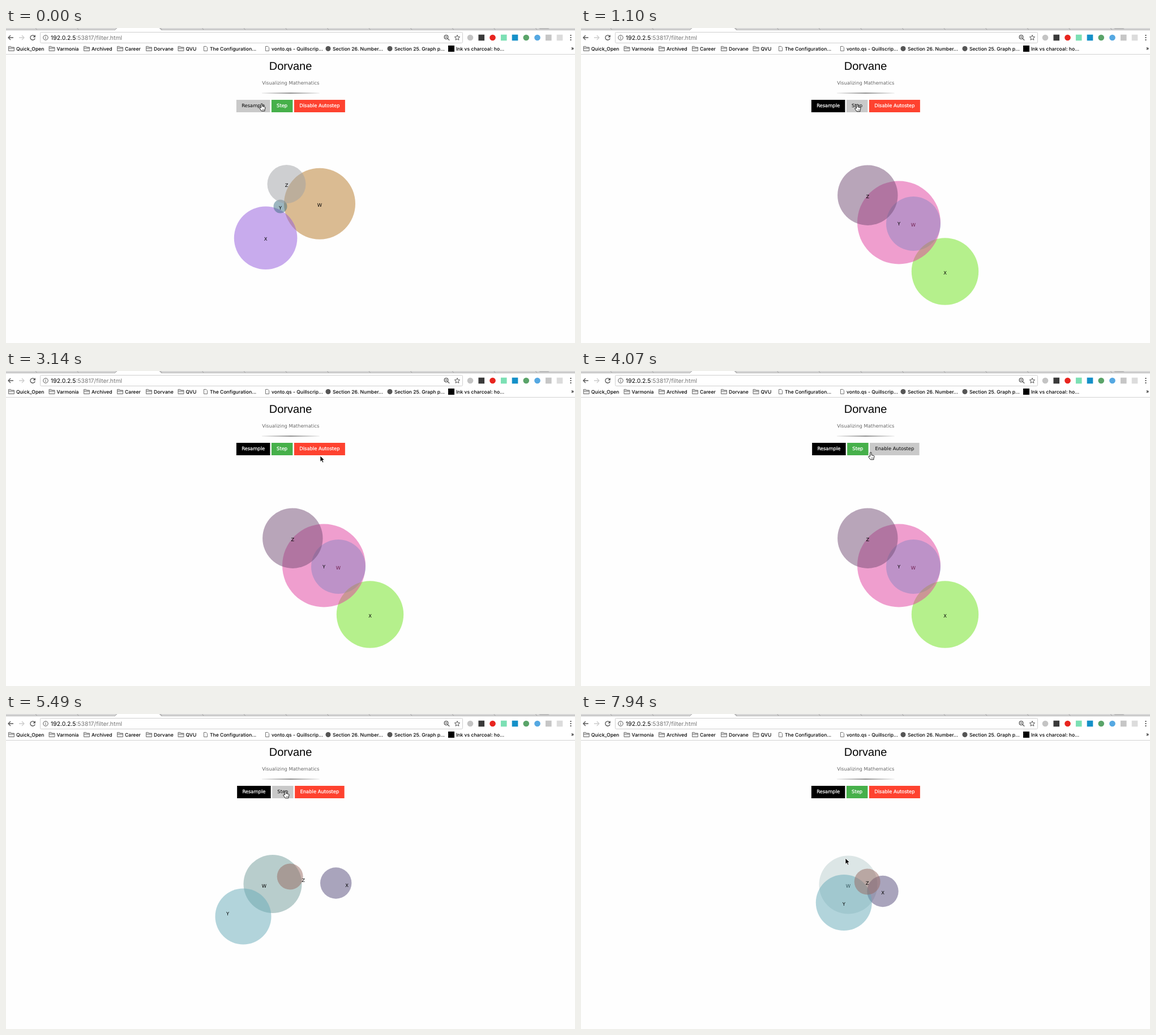
Recreate the animation shown at these times as an HTML page. Size 1005x557 px, loop 8000 ms.

```html
<!DOCTYPE html>
<html lang="en">
<head>
<meta charset="utf-8">
<title>Circle layout</title>
<style>
  html, body { margin: 0; width: 100%; height: 100%; overflow: hidden; background: #fefefe; }
  svg { display: block; width: 1005px; height: 557px; text-rendering: geometricPrecision; }
  .bar { font: 500 8.6px Inter, sans-serif; }
  .url { font: 10.4px Inter, sans-serif; }
  .title { font: 20px "Liberation Sans", Arial, sans-serif; }
  .page { font: 8.4px "DejaVu Sans", Verdana, sans-serif; }
  .mid { text-anchor: middle; }
  .line { fill: none; stroke: #555; stroke-width: 1.3; }
</style>
</head>
<body>
<svg viewBox="0 0 1005 557">
  <defs>
    <linearGradient id="fade">
      <stop offset="0" stop-color="#222" stop-opacity=".1"/>
      <stop offset=".5" stop-color="#222"/>
      <stop offset="1" stop-color="#222" stop-opacity=".1"/>
    </linearGradient>
    <clipPath id="canvas"><rect x="277" y="150" width="451.5" height="393.5"/></clipPath>
  </defs>

  <!-- browser bars -->
  <rect width="1005" height="46" fill="#fff"/>
  <g id="tabs"></g>
  <path d="M0 46.5H1005" stroke="#d2d2d2"/>
  <path class="line" d="M13 17H4M8 13L4 17L8 21"/>
  <path class="line" style="stroke:#ccc" d="M23 17h9M28 13l4 4l-4 4"/>
  <path class="line" d="M50.6 14.6A4.2 4.2 0 1 0 51.2 18.2"/>
  <path d="M52 12v4.5h-4.5z" fill="#555"/>
  <rect x="60.5" y="7.5" width="746" height="19" rx="2" fill="#fff" stroke="#cfcfcf"/>
  <circle class="line" cx="70" cy="17" r="4.2" style="stroke-width:1"/>
  <path d="M70 16.3v3M70 14.2v1.1" stroke="#555"/>
  <text class="url" x="79" y="20.7">192.0.2.5<tspan fill="#777">:53817/filter.html</tspan></text>
  <circle class="line" cx="777.5" cy="16" r="3.3"/>
  <path class="line" d="M780 18.6l3.2 3.2M776 16h3"/>
  <path id="star" class="line" style="stroke-width:1"/>
  <g id="icons"></g>
  <path d="M997.5 12v2m0 2v2m0 2v2" stroke="#555" stroke-width="2"/>
  <g id="marks" class="bar"></g>
  <text class="bar" x="998" y="39">»</text>

  <!-- page -->
  <text class="title mid" x="502.5" y="74">Dorvane</text>
  <text class="page mid" x="502.8" y="100" fill="#666">Visualizing Mathematics</text>
  <rect x="452" y="114.6" width="101.5" height="1" fill="url(#fade)"/>
  <g id="buttons" class="page mid"></g>
  <g id="shapes" class="page mid" clip-path="url(#canvas)"></g>
  <g id="pointer"></g>
</svg>
<script>
const el = id => document.getElementById(id);
const dot = (x, y, r, fill) => `<circle cx="${x}" cy="${y}" r="${r}" fill="${fill}"/>`;
const box = (x, y, r, fill) => `<rect x="${x - r}" y="${y - r}" width="${2 * r}" height="${2 * r}" fill="${fill}"/>`;

// ---- browser bars ----
let tabs = '<rect width="1005" height="3.5" fill="#d6d6d6"/><path d="M0 3.5H1005" stroke="#b4b4b4"/>';
for (let x = 54; x < 940; x += 73.6) tabs += `<path d="M${x - 2} 0l3 3.5" stroke="#aaa"/>`;
el('tabs').innerHTML = tabs +
  '<path d="M192 4l4-4H271l4 4z" fill="#fff"/><path d="M192 4l4-4M275 4l-4-4" stroke="#aaa"/>' +
  '<path d="M941 0h17l2 2h-17z" fill="#bbb"/>';

let star = '';
for (let i = 0; i < 10; i++) {
  const r = i % 2 ? 2.2 : 4.9, a = i * Math.PI / 5;
  star += `${i ? 'L' : 'M'}${797 + r * Math.sin(a)} ${17.3 - r * Math.cos(a)}`;
}
el('star').setAttribute('d', star + 'z');

el('icons').innerHTML = [
  [dot, '#c4c4c4'], [box, '#3a3a3a'], [dot, '#e8251f'], [box, '#7ce0b4'], [box, '#1590c8'],
  [dot, '#5aa469'], [dot, '#55a8e2'], [box, '#c6c6c6'], [box, '#dcdcdc']
].map(([shape, fill], i) => shape(820 + 19.75 * i, 17, 5.3, fill)).join('');

// each bookmark icon: its drawing and the distance to its label
const folder = [14, '<path d="M.5 40.5v-8h4l1 1.5h5v6.5zM.5 35.5h10" fill="#e4e4e4" stroke="#666" stroke-width=".9"/>'];
const sheet = [11, '<path d="M.5 32.5h4l2 2v6h-6z" fill="#fff" stroke="#666" stroke-width=".9"/>'];
const round = [13, dot(5, 36.5, 4.5, '#555')];
const square = [14, box(5.5, 36.5, 5.5, '#000')];
el('marks').innerHTML = [
  [folder, 4, 'Quick_Open'], [folder, 75.5, 'Varmonia'], [folder, 137, 'Archived'],
  [folder, 196, 'Career'], [folder, 247, 'Dorvane'], [folder, 303.5, 'QVU'],
  [sheet, 349, 'The Configuration...'], [sheet, 458, 'vonto.qs - Quillscrip...'],
  [round, 564, 'Section 26. Number...'], [round, 673, 'Section 25. Graph p...'],
  [square, 781, 'Ink vs charcoal: ho...']
].map(([[gap, icon], x, label]) =>
  `<g transform="translate(${x})">${icon}<text x="${gap}" y="39.5">${label}</text></g>`).join('');

// ---- circles: settled place, radius and colour, painted in this order ----
const names = ['W', 'X', 'Y', 'Z'];
const circle = (x, y, r, rgb) => ({ x, y, r, rgb });
const samples = [
  [circle(554, 310.7, 63, '183,123,41'), circle(458.6, 371.3, 55.8, '147,91,221'),
   circle(484.5, 315.5, 12, '58,110,130'), circle(495.5, 276, 34, '159,161,165')],
  [circle(587, 346, 48, '55,205,231'), circle(643, 430.5, 59.2, '111,227,29'),
   circle(561.5, 344, 73.5, '225,65,159'), circle(506.3, 295.7, 53.2, '117,79,119')],
  [circle(472, 302, 51.5, '117,157,155'), circle(533, 313.5, 27.7, '87,77,125'),
   circle(464.3, 333.5, 49.5, '105,171,185'), circle(505.7, 296.5, 23, '152,106,98')]
];

// poses on the way: circle x, y and label x, y
const scattered = [[636, 501, 551, 210], [606.3, 339.5, 680, 522], [690, 478, 440, 222], [491, 209, 501, 359.5]];
const loose = [[471, 300.5, 456, 304], [582.7, 299, 602, 303], [419, 358, 391.5, 353], [501.7, 287.5, 525, 294]];
const near = [[475.5, 301.5, 473, 303.5], [549.3, 308.7, 554.5, 310], [447.5, 338.7, 442, 342], [502.5, 297, 504.5, 297.5]];

const resamples = [420, 4840], steps = [5490, 5670, 5870, 6260];
const autoOff = 4070, autoOn = 7030;
const countUntil = (times, t) => times.filter(s => s <= t).length;

function poseAt(t, sample) {
  if (t >= 420 && t < 1100) return scattered;
  if (t >= 4840 && t < autoOn) {
    // every click closes part of the remaining distance
    const left = ((4 - countUntil(steps, t)) / 3) ** 3;
    return near.map((p, i) => p.map((v, j) => v + (loose[i][j] - v) * left));
  }
  return sample.map(({ x, y }) => [x, y, x, y + 2]);
}

function drawShapes(t) {
  const sample = samples[countUntil(resamples, t)];
  el('shapes').innerHTML = poseAt(t, sample).map(([x, y, lx, ly], i) => {
    const alpha = i === 0 && t >= 7940 ? .25 : .5;
    return dot(x, y, sample[i].r, `rgba(${sample[i].rgb},${alpha})`) +
      `<text x="${lx}" y="${ly + 3}">${names[i]}</text>`;
  }).join('');
}

// ---- pointer: glides as begin, end, x, y; it rests in between ----
const glides = [
  [0, 0, 452, 134], [420, 560, 488, 135], [1640, 2220, 501.5, 249], [2250, 2700, 549, 108],
  [2690, 3140, 555, 150], [3290, 3440, 555, 141], [3920, 4070, 512, 144], [4070, 4540, 452, 136],
  [5040, 5190, 494, 136], [6110, 6580, 530, 136], [7210, 7940, 467, 255]
];
const arrow = '<path d="M0 0V10.5l2.4-2.2l1.7 3.7l1.8-.8l-1.6-3.6h3.3z" fill="#000" stroke="#fff" stroke-width=".8"/>';
const hand = '<path d="M-1.4 7V1a1.2 1.2 0 0 1 2.4 0V4.6l3.8.9q1.4.4 1.2 1.9L5 10.6V12.7H-.8L-3.9 8.3q-.8-1.7.7-1.7z" fill="#fff" stroke="#000" stroke-width=".9"/><path d="M1.2 9v2M3.2 9v2" stroke="#000" stroke-width=".6"/>';

// the screen shows a glide in steps of about 150 ms
function pointerAt(t) {
  let x = 0, y = 0;
  for (const [begin, end, toX, toY] of glides) {
    if (t < begin) break;
    const count = Math.round((end - begin) / 150);
    const k = t >= end ? 1 : Math.floor((t - begin) / (end - begin) * count) / count;
    x += (toX - x) * k * k;
    y += (toY - y) * k * k;
  }
  return [x, y];
}

function drawControls(t) {
  const [px, py] = pointerAt(t);
  const auto = t < autoOff || t >= autoOn;
  const row = [
    ['Resample', 59.5, '#000'], ['Step', 37.5, '#46b04a'],
    auto ? ['Disable Autostep', 90, '#fe422f'] : ['Enable Autostep', 87.5, '#fe422f']
  ];
  const gap = 2.5;
  let x = 502.9 - (row.reduce((sum, b) => sum + b[1], 0) + 2 * gap) / 2;
  let over = false;
  el('buttons').innerHTML = row.map(([label, w, fill]) => {
    const hit = px >= x && px < x + w && py >= 127 && py < 149;
    const ink = hit ? '#000' : '#fff';
    const html = `<rect x="${x}" y="127" width="${w}" height="22" fill="${hit ? '#c9c9c9' : fill}"/>` +
      `<text x="${x + w / 2}" y="140.3" fill="${ink}" stroke="${ink}" stroke-width="${hit ? 0 : .25}">${label}</text>`;
    over = over || hit;
    x += w + gap;
    return html;
  }).join('');
  el('pointer').innerHTML = over ? hand : arrow;
  el('pointer').setAttribute('transform', `translate(${px} ${py})`);
}

const start = performance.now();
function tick() {
  const t = (performance.now() - start) % 8000;
  drawControls(t);
  drawShapes(t);
  requestAnimationFrame(tick);
}
tick();
</script>
</body>
</html>
```
